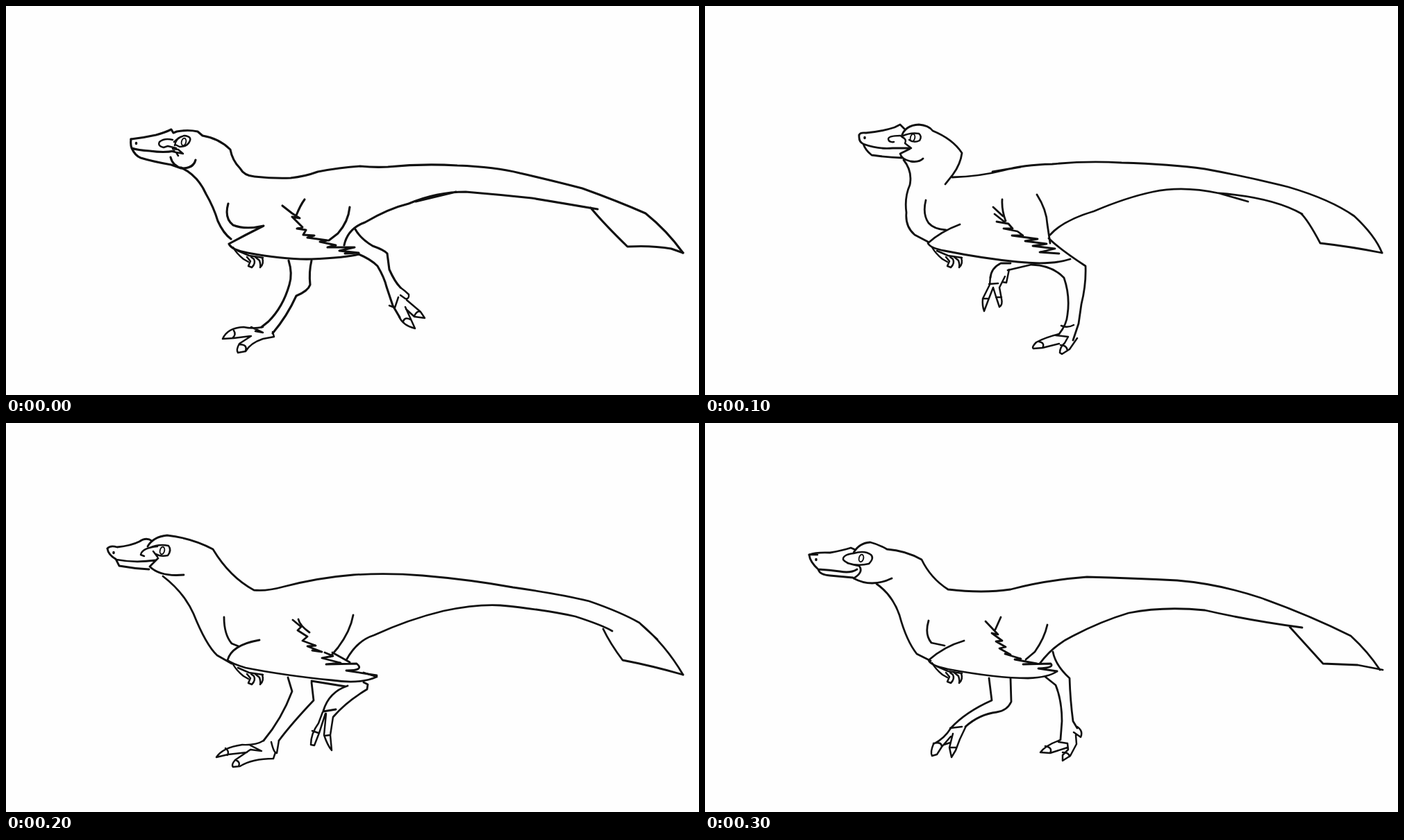
Animation, 998 px wide and 561 px high, one loop 0.35 s. Source, as an HTML page without scripts:

```html
<!DOCTYPE html>
<html lang="en">
<head>
<meta charset="utf-8">
<title>Running dinosaur</title>
<style>
html, body { margin: 0; width: 100%; height: 100%; overflow: hidden; background: #fefefe; }
svg { display: block; width: 100vw; height: 100vh; }
path, ellipse { fill: none; stroke: #101010; stroke-width: var(--w, 2.8); stroke-linecap: round; stroke-linejoin: round; }
.fine path { stroke-width: 2.5; }
.pupil, .pupil path { stroke-width: 1.9; }
.dot { fill: #101010; stroke: none; }
.pose { visibility: hidden; animation: show 350ms step-end infinite; animation-delay: calc(var(--i) * 50ms - 350ms); }
@keyframes show {
  0% { visibility: visible; }
  14.285714%, 100% { visibility: hidden; }
}
</style>
</head>
<body>
<svg viewBox="0 0 998 561" preserveAspectRatio="none">
<defs>
  <g id="hand" class="fine">
    <path d="M327 348Q332 357 342 365L349 369M334 353L350 360L370 363"/>
    <path d="M347 362L352 368L349 375L354 377Q360 371 357 365L353 362M359 362L365 367Q367 373 366 377Q372 372 369 363"/>
  </g>
  <g id="pupil">
    <ellipse class="pupil" rx="3.2" ry="5.4" transform="rotate(12)"/>
  </g>
  <ellipse id="nostril" class="dot" rx="1.8" ry="2.2"/>
</defs>

<g class="pose" style="--i:0;--w:3.1">
  <path d="M180 192Q198 190 216 186Q230 182 238 178L241 183L246 181Q262 178 276 181L283 187Q307 191 323 207Q326 223 337 234Q343 245 358 246Q386 249 410 248Q430 246 449 239Q480 233 510 231Q530 233 550 232Q600 227 650 230Q705 232 740 241Q780 250 830 263Q880 281 921 299Q952 324 975 356"/>
  <path d="M180 192Q179 200 181 205Q190 208 207 209Q228 212 242 209M181 205Q186 216 194 219Q210 224 238 229L252 234M237 218Q240 231 254 234Q270 234 273 222"/>
  <g class="fine">
    <path d="M240 210L255 213L248 207L240 206M245 211L248 216M243 201Q245 189 257 187Q267 188 265 194Q262 203 250 203L244 200M240 193Q228 190 221 196Q218 202 227 204L233 202L245 205M242 196L249 190"/>
    <use href="#pupil" x="256" y="196"/><use href="#nostril" x="187.500" y="198"/>
  </g>
  <path d="M252 233Q276 244 288 271Q299 290 305 310Q313 328 324 336M320 285Q314 306 327 316Q345 323 371 317Q345 330 321 343Q325 352 348 356Q402 366 440 365Q490 363 508 358"/>
  <path d="M398 288L412 299L423 306L412 304L427 319L419 321L432 323L428 330L444 331L434 334L463 338L452 340L475 345L463 348L502 348L480 353L508 356L488 357M430 279Q424 287 418 302M495 290Q493 311 478 328L465 338"/>
  <path d="M487 345Q492 321 517 312Q551 292 580 285Q620 268 662 268Q710 272 757 277Q800 284 852 293M842 291Q862 315 895 347Q930 345 958 350L975 356M590 282L648 268"/>
  <path d="M407 367Q413 386 408 402Q399 434 378 455L368 463M440 367Q436 384 438 402Q435 411 418 418Q405 447 384 472"/>
  <g class="fine">
    <path d="M370 463Q355 466 342 463Q319 464 312 480L328 479L352 476M328 468Q332 474 326 479M353 463L370 471L359 469M353 476L336 487Q331 496 334 500L345 498Q352 486 370 480L386 477L384 470M336 488Q348 488 345 497"/>
    <path d="M568 406Q575 411 580 416Q581 423 575 422L568 417M577 424L597 441L603 450L588 448L576 437M597 441Q592 439 588 447M575 434L589 465Q572 461 566 448M582 452Q574 448 572 455M552 432L560 435L565 420"/>
  </g>
  <path d="M503 322Q510 335 528 346Q545 352 549 357L552 380Q560 398 568 406M508 358Q525 365 535 375Q545 392 548 405L557 432L567 449"/>
  <use href="#hand"/>
</g>

<g class="pose" style="--i:1">
  <path d="M208 186L222 185Q245 181 264 175L273 180M269 186Q273 177 285 174Q300 173 312 183Q336 194 356 214Q349 232 349 240L351 248M341 245Q400 246 440 239Q490 230 540 229Q600 224 660 227Q720 231 780 246Q840 259 880 276Q931 300 950 321Q967 339 975 356"/>
  <path d="M208 186Q205 194 213 202Q240 208 265 206L283 204M213 201Q216 210 224 216Q250 220 276 224M280 207L266 215Q270 222 280 226Q291 231 299 221"/>
  <g class="fine">
    <path d="M272 191Q280 183 291 184Q296 189 291 196Q284 201 275 193M266 189Q253 187 252 192Q252 198 260 196M266 189L277 191M266 176L270 183"/>
    <use href="#pupil" x="285" y="190"/><use href="#nostril" x="215.500" y="191"/>
  </g>
  <path d="M276 225Q294 241 296 265Q298 294 308 316Q313 331 326 338M321 283Q316 306 327 314Q340 321 354 322M369 317Q340 328 320 344Q330 353 350 356Q405 367 465 369Q500 371 521 365"/>
  <path d="M406 287Q419 298 426 310L416 304M407 293L419 300M426 310L434 319L422 318L438 325L427 326L452 331L440 333L490 338L467 343L497 346L477 350L510 354L489 358L521 366M429 278Q424 292 428 306M491 280Q495 305 486 325L478 340"/>
  <path d="M492 345Q502 318 540 297Q570 287 600 277Q627 267 655 267Q705 269 750 276Q800 286 850 298L868 303M848 298Q860 305 870 318L889 341Q910 347 940 347L975 356"/>
  <path d="M455 372Q465 388 467 402Q463 429 442 460L425 475M486 371Q490 388 499 401L498 410Q480 424 474 445Q462 460 463 472M495 335L501 350M521 370L497 394M510 364L521 370"/>
  <g class="fine">
    <path d="M443 475Q430 479 420 477Q397 481 390 488V493L407 493L428 489M400 484Q409 486 406 493M434 481L429 492Q415 498 416 509L428 505Q440 500 445 487L463 473M421 496Q430 496 427 505"/>
    <path d="M483 371L487 380L490 374M482 430L481 447L473 456Q472 465 476 468L480 456L485 439L487 448L494 464L495 450Q492 440 494 430L489 419M473 456L480 456M487 449L495 450"/>
  </g>
  <use href="#hand" y="3"/>
</g>

<g class="pose" style="--i:2">
  <path d="M222 186Q223 182 232 183Q255 181 273 175L281 171L287 177M283 188Q288 172 308 171Q322 172 328 180Q357 192 370 212Q368 228 357 243L346 257M356 247Q395 246 430 237Q458 229 500 228Q550 223 600 226Q670 228 720 235Q780 246 840 261Q901 279 935 303Q965 331 975 356M414 239L455 232"/>
  <path d="M222 186Q221 196 228 199Q250 207 270 205L295 205M228 199Q231 208 240 215Q260 218 284 219M295 206L281 213Q283 221 296 224Q308 226 314 220"/>
  <g class="fine">
    <path d="M283 188Q296 182 308 184Q313 188 309 194Q301 198 294 193M281 187Q264 187 264 192Q265 197 272 196M284 189Q291 192 288 198L297 205"/>
    <use href="#pupil" x="299" y="190"/><use href="#nostril" x="230" y="190"/>
  </g>
  <path d="M286 222Q299 238 295 258Q287 276 290 298Q288 318 302 330L321 340M318 280Q313 300 322 313Q330 322 347 323M367 315Q340 325 321 342Q324 349 345 353Q400 364 450 369Q498 374 526 365"/>
  <path d="M428 279Q427 294 433 310M415 290L429 303M417 300L431 311M420 311L437 314L443 321L430 321L450 325L458 331L442 331L479 336L461 339L492 343L472 346L504 350L482 355L510 357M478 272Q492 294 493 315L497 342"/>
  <path d="M497 330Q516 309 560 296Q607 276 645 268Q688 259 740 270Q818 276 860 300M740 270L782 282M858 299Q868 308 886 342Q930 347 975 356"/>
  <path d="M495 335Q510 350 548 375Q549 402 542 430L538 458L530 482M470 373Q500 374 517 392Q526 418 522 445Q521 459 510 473M440 371L426 371Q412 378 411 392M436 381L470 373"/>
  <g class="fine">
    <path d="M411 390L410 402L400 422Q399 432 402 440L408 424L415 406L419 419L424 434Q429 431 427 422L424 406L432 390L428 398L434 399L438 380M400 422L407 422M419 420L427 420M409 401L422 400"/>
    <path d="M513 461Q522 465 531 460M510 473Q490 478 477 485Q470 492 473 494L486 493L510 487M481 484Q490 486 486 493M505 475L523 477L518 486Q511 492 511 500L514 502L525 495L536 479M512 489Q521 489 522 497"/>
  </g>
  <use href="#hand"/>
</g>

<g class="pose" style="--i:3">
  <path d="M183 174Q188 171 197 173Q218 172 228 165L241 162L248 167M246 175Q254 160 270 159Q284 163 294 170Q318 179 331 193Q337 230 357 246L376 242M362 247Q410 237 450 230Q480 225 510 227Q555 222 600 224Q670 227 720 234Q800 246 850 262Q895 276 925 291Q950 318 972 368"/>
  <path d="M183 174Q179 186 190 191Q215 195 250 193L257 192M191 192Q193 199 199 204Q220 207 243 209M257 193L245 206Q265 216 287 211"/>
  <g class="fine">
    <path d="M246 176L269 173Q274 181 267 188Q256 191 251 185M249 178Q227 175 226 181Q228 187 236 185M247 182L254 189L246 196"/>
    <use href="#pupil" x="261" y="181"/><use href="#nostril" x="190" y="181"/><path d="M632 228V232"/>
  </g>
  <path d="M249 211Q272 230 275 258Q279 303 295 327Q307 337 322 342M316 281Q315 305 325 317L343 323M366 314Q335 323 320 342Q325 350 350 354Q400 365 450 373Q500 376 533 365L510 356"/>
  <path d="M416 289L428 299M426 284Q428 298 437 308M419 295L433 306M426 307L441 317L432 319L453 325L443 329L466 335L458 338L487 345L470 347L506 349Q512 355 482 355M477 266Q488 285 490 305L496 335"/>
  <path d="M497 331Q516 305 560 293Q606 278 640 268Q674 257 740 265Q812 271 872 302M858 298Q867 316 888 344Q930 350 967 360"/>
  <path d="M413 370L417 392L386 412Q365 432 347 452M441 375L440 408L412 421Q385 440 373 453M434 374L440 404M497 335Q510 350 557 362Q562 390 580 431M500 374Q525 376 541 388Q550 415 574 454"/>
  <g class="fine">
    <path d="M347 451Q328 467 326 488L339 479L352 464M331 472Q340 470 339 479M347 452L357 454M360 462L355 478L349 490L346 478L355 465M346 478L355 477M364 461L368 468L373 453M364 461L367 452"/>
    <path d="M580 431Q592 441 607 448L627 460L610 462L598 458M606 457L616 456L627 460M576 438L574 454Q587 473 605 478L624 475L604 470L592 460M601 470L605 478M586 448L607 462"/>
  </g>
  <use href="#hand" y="2"/>
</g>

<g class="pose" style="--i:4">
  <path d="M146 181Q150 176 160 179Q180 177 192 171Q202 164 210 170M204 178Q212 164 232 162Q268 166 298 182Q322 222 357 241Q375 243 400 236Q450 223 500 219Q550 216 600 220Q670 226 730 237Q800 247 840 257Q886 273 912 288Q950 320 975 363M914 290L938 312"/>
  <path d="M146 181Q147 190 159 197Q185 202 215 198M158 196L163 206Q185 210 206 211M219 195L207 207Q222 222 256 219"/>
  <g class="fine">
    <path d="M207 180Q220 174 234 177Q239 183 233 191Q222 193 216 189M194 190Q196 180 218 178M194 190L199 192M212 185L218 193"/>
    <use href="#pupil" x="225" y="184"/><use href="#nostril" x="155" y="187"/>
  </g>
  <path d="M226 221Q256 244 270 275Q288 320 304 335L325 347M314 280Q314 305 325 318L335 322M365 313Q325 320 319 342Q325 347 345 353Q400 364 470 371Q510 377 534 366L515 360"/>
  <path d="M421 283Q423 292 437 302M413 284L425 294L420 299L434 308L427 314L446 321L434 322L455 330L441 328M459 331L471 336L455 339L482 346L461 348L505 347Q517 357 490 357M490 357L534 364M500 277Q496 300 478 324L467 337M470 331L495 345"/>
  <path d="M490 342Q505 314 530 306Q580 283 630 271Q678 261 712 263Q775 269 820 279Q860 292 873 300M860 297Q870 318 888 342Q930 350 975 363"/>
  <path d="M406 367L412 387Q397 427 371 458M440 374L443 400Q410 435 393 458M492 379Q465 388 457 415M440 372L489 380M515 374L521 377L520 384Q490 402 472 423M457 416L475 413"/>
  <g class="fine">
    <path d="M371 458Q360 465 340 464Q312 468 303 482L320 478L347 475M316 469Q322 473 319 479M352 465L368 473L352 471L330 486Q324 493 327 496L337 495Q355 484 385 484L388 475M331 486Q338 489 335 495M382 460Q386 477 390 476L393 458"/>
    <path d="M456 417L450 433Q439 448 439 464L444 465L451 447L460 419M441 444L450 447M461 419L458 450Q463 465 469 472L467 450L471 424M459 451L467 450"/>
  </g>
  <use href="#hand"/>
</g>

<g class="pose" style="--i:5">
  <path d="M123 190Q130 184 150 185Q165 186 176 180L190 181M185 188Q200 174 220 175Q250 172 274 180Q302 215 335 230Q368 243 410 234Q473 218 520 218Q600 216 680 224Q750 232 820 249Q870 260 907 275Q948 299 970 352M274 180L292 195M808 247L885 266"/>
  <path d="M123 190Q128 200 139 207Q165 213 188 208L196 206M134 206L145 218Q165 222 186 222M196 206L186 216Q183 220 198 229Q225 238 240 223"/>
  <g class="fine">
    <path d="M185 188Q200 182 212 187Q218 194 211 202Q200 206 190 201M168 195Q170 188 188 188M168 195L179 203M190 206L197 211"/>
    <use href="#pupil" x="199" y="194"/><use href="#nostril" x="134" y="197"/>
  </g>
  <path d="M221 233Q241 249 256 277Q278 313 297 335Q310 345 327 349M313 278Q313 305 327 318M364 312Q325 318 320 338Q325 347 350 353Q400 364 470 372Q520 378 538 371Q530 364 510 362"/>
  <path d="M428 277L418 288M413 284L430 297L422 298Q425 303 434 304L428 308Q432 313 438 313L430 318Q440 326 452 327M450 327L460 332L444 331L481 340L461 338M464 331Q485 333 492 345L459 346L508 348Q518 361 485 360M505 289Q497 310 467 328"/>
  <path d="M485 340Q518 307 550 297Q605 276 660 269Q705 264 750 269Q832 279 873 303M862 300L881 325Q930 338 970 352"/>
  <path d="M426 371Q400 382 397 399M452 375Q435 387 425 390M450 376L462 398Q457 430 433 460M482 376L490 402Q470 435 465 450L453 468M398 398L417 393"/>
  <g class="fine">
    <path d="M397 398Q388 410 387 426Q381 440 384 450L388 449Q392 438 391 428Q395 412 409 400L407 427Q407 440 412 447L416 447Q416 435 412 428Q413 413 418 404L427 401L423 393M387 426L391 428M407 427L412 428"/>
    <path d="M433 460Q415 468 398 474Q378 479 379 486L398 487L421 478M393 475Q401 477 399 487M420 465L433 471L421 472M425 479L408 487Q402 494 404 498L416 497Q433 486 450 480M410 487Q421 487 418 495M447 465L451 483L456 470L451 464"/>
  </g>
  <use href="#hand" y="-1"/>
</g>

<g class="pose" style="--i:6">
  <path d="M150 190Q160 186 180 187Q197 184 210 180L217 183M214 187Q222 173 238 172Q250 175 262 182Q289 184 312 197Q325 224 350 240Q400 246 440 240Q488 227 550 222Q620 224 680 227Q740 232 800 252Q870 277 930 307Q955 330 972 356"/>
  <path d="M150 190Q151 200 163 211Q180 212 194 214Q210 217 219 211M163 211Q165 219 180 220L213 223M222 206Q229 215 214 224Q240 238 269 224"/>
  <g class="fine">
    <path d="M214 188Q230 183 239 190Q244 195 236 203Q220 207 205 202M214 188Q198 190 199 197Q203 203 222 206M150 190L162 190"/>
    <use href="#pupil" x="225" y="195"/><use href="#nostril" x="160" y="197"/>
  </g>
  <path d="M247 232Q270 248 280 277Q290 314 305 333L325 343M322 285Q316 305 326 317L345 321M373 314Q345 322 322 342Q325 350 350 355Q420 368 465 368Q495 367 507 358"/>
  <path d="M404 286L422 305L413 303L428 314L419 315L433 323L424 325L440 334L432 333L455 340L446 341L478 347L458 348L498 347Q504 353 480 354L507 358M426 280L418 298M493 291Q489 310 475 330L462 341"/>
  <path d="M482 347Q501 321 530 307Q570 286 610 274Q660 264 720 270Q780 284 860 295M842 294L890 347L940 349L976 356"/>
  <path d="M409 368L413 400Q375 417 354 440M440 368L441 402Q435 415 420 417Q395 420 375 438M501 330Q505 350 525 368Q526 400 530 430L536 440M490 366L505 378Q514 400 514 430L512 456"/>
  <g class="fine">
    <path d="M354 440Q345 455 329 463Q324 475 327 480L334 478L341 467L354 452M329 462Q341 459 341 467M353 440L370 438M357 448L352 468L355 482L361 472L367 456L376 437M352 468L361 468M344 464L353 461"/>
    <path d="M512 457Q490 465 483 475L497 476L522 468M490 466Q501 468 497 476M509 460L522 462L523 471L515 479V487L526 480L535 463L534 450M515 475Q524 475 525 481M531 446L541 453Q545 444 536 438"/>
  </g>
  <use href="#hand" y="-2"/>
</g>
</svg>
</body>
</html>
```
